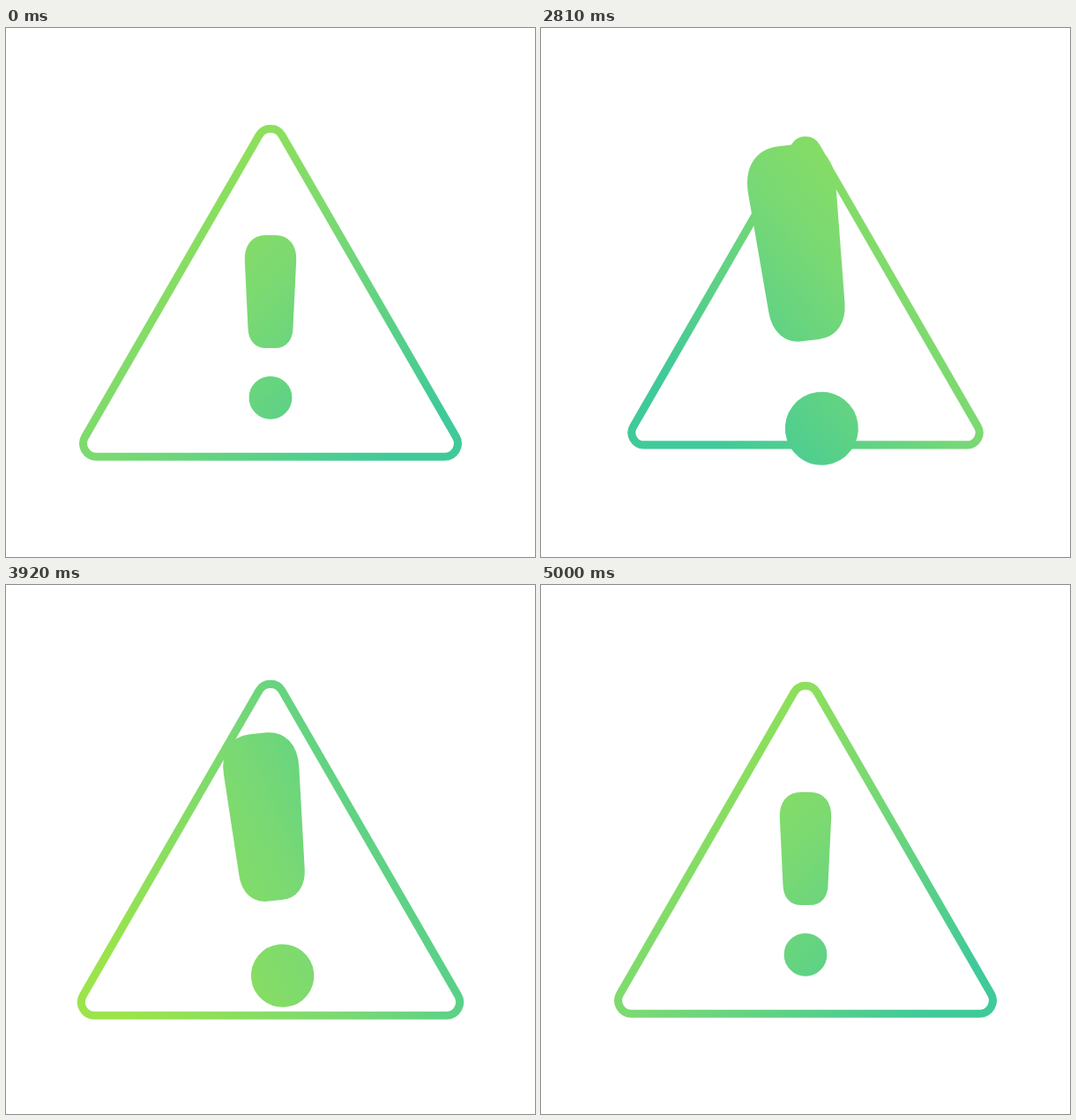
Write an HTML page with a canvas that moves like this. It is 600x600 px and loops after 5030 ms.

```html
<!DOCTYPE html>
<html lang="en">
<head>
<meta charset="utf-8">
<title>Warning sign</title>
<style>
  html, body { margin: 0; width: 100%; height: 100%; overflow: hidden; background: #fff; }
  canvas { display: block; width: 600px; height: 600px; }
</style>
</head>
<body>
<canvas id="stage" width="600" height="600"></canvas>
<script>
const ctx = document.getElementById('stage').getContext('2d');
const LOOP = 5030, REST = 2000, STEP = 30;

// Each pose eases into the next; shift is how far the mark hangs below centre.
const poses = [
  { at: 0,    frame: 1,     size: 1,     turn: 0,     shift: 37.8 },
  { at: 400,  frame: 0.856, size: 2.38,  turn: 22.3,  shift: -2 },
  { at: 950,  frame: 0.942, size: 1.645, turn: -12.7, shift: 14.2 },
  { at: 1600, frame: 0.858, size: 2.39,  turn: -20.5, shift: -2 },
  { at: 2180, frame: 1.122, size: 0.856, turn: 4.8,   shift: 38.2 },
  { at: 2700, frame: 1,     size: 1,     turn: 0,     shift: 37.8 },
  { at: 3000, frame: 1,     size: 1,     turn: 0,     shift: 37.8 }
];

// Gradient: time, direction in degrees, slide along that direction
const sweep = [
  [0, 45, 0], [510, 86, 0], [1170, 213, -85],
  [1650, 293, 0], [2160, 367, 0], [3000, 405, 0]
];

const rad = deg => deg * Math.PI / 180;

function poseAt(t) {
  let i = 0;
  while (i < poses.length - 2 && t >= poses[i + 1].at) i++;
  const a = poses[i], b = poses[i + 1];
  const x = (t - a.at) / (b.at - a.at);
  const e = x * x * (3 - 2 * x);
  const mix = key => a[key] + (b[key] - a[key]) * e;
  return { frame: mix('frame'), size: mix('size'), turn: mix('turn'), shift: mix('shift') };
}

function slope(i, col) {
  const p = sweep[i - 1], n = sweep[i + 1];
  return p && n ? (n[col] - p[col]) / (n[0] - p[0]) : 0;
}

// Smooth curve through one column of the sweep, at rest at both ends
function sweepAt(t, col) {
  let i = 0;
  while (i < sweep.length - 2 && t >= sweep[i + 1][0]) i++;
  const a = sweep[i], b = sweep[i + 1];
  const d = b[0] - a[0], x = (t - a[0]) / d, y = 1 - x;
  return a[col] * y * y * (1 + 2 * x) + b[col] * x * x * (3 - 2 * x)
    + d * x * y * (slope(i, col) * y - slope(i + 1, col) * x);
}

function paintAt(t) {
  const a = rad(sweepAt(t, 1)), mid = sweepAt(t, 2), reach = 228;
  const point = d => [300 + d * Math.cos(a), 300 + d * Math.sin(a)];
  const g = ctx.createLinearGradient(...point(mid - reach), ...point(mid + reach));
  g.addColorStop(0, '#9be44b');
  g.addColorStop(0.5, '#7ad973');
  g.addColorStop(1, '#40ca99');
  return g;
}

function drawTriangle(scale) {
  const top = 300.2 - 200.9 * scale, base = 300.2 + 186.1 * scale;
  const half = 223.4 * scale, r = 15 * scale;
  ctx.beginPath();
  ctx.moveTo(300, base);
  ctx.arcTo(300 - half, base, 300, top, r);
  ctx.arcTo(300, top, 300 + half, base, r);
  ctx.arcTo(300 + half, base, 300, base, r);
  ctx.closePath();
  ctx.lineWidth = 9.1;
  ctx.stroke();
}

// Rounded corner; (cx, cy) is the sharp corner
function corner(x0, y0, cx, cy, x1, y1) {
  const k = 0.62;
  ctx.lineTo(x0, y0);
  ctx.bezierCurveTo(x0 + (cx - x0) * k, y0 + (cy - y0) * k,
    x1 + (cx - x1) * k, y1 + (cy - y1) * k, x1, y1);
}

function drawMark({ size, turn, shift }) {
  const flat = 5.5, top = -100.8, low = 23.2;
  ctx.save();
  ctx.translate(300, 300 + shift / 2);
  ctx.rotate(rad(turn));
  ctx.translate(0, shift / 2);
  ctx.scale(size, size);
  ctx.beginPath();
  ctx.moveTo(-flat, top);
  corner(flat, top, 28.4, top, 27.2, -74);
  corner(23.5, 3, 22.6, low, flat, low);
  corner(-flat, low, -22.6, low, -23.5, 3);
  corner(-27.2, -74, -28.4, top, -flat, top);
  ctx.closePath();
  ctx.moveTo(22.4, 81.5);
  ctx.arc(0, 81.5, 22.4, 0, 2 * Math.PI);
  ctx.restore();
  // The outline keeps its weight at every size
  ctx.lineWidth = 4;
  ctx.fill();
  ctx.stroke();
}

function draw(now) {
  const time = now % LOOP;
  const t = Math.min(3000, Math.max(0, Math.floor((time - REST) / STEP) * STEP));
  const pose = poseAt(t);
  ctx.fillStyle = '#fff';
  ctx.fillRect(0, 0, 600, 600);
  ctx.fillStyle = ctx.strokeStyle = paintAt(t);
  ctx.lineJoin = 'round';
  drawTriangle(pose.frame);
  drawMark(pose);
  requestAnimationFrame(draw);
}

draw(0);
</script>
</body>
</html>
```
